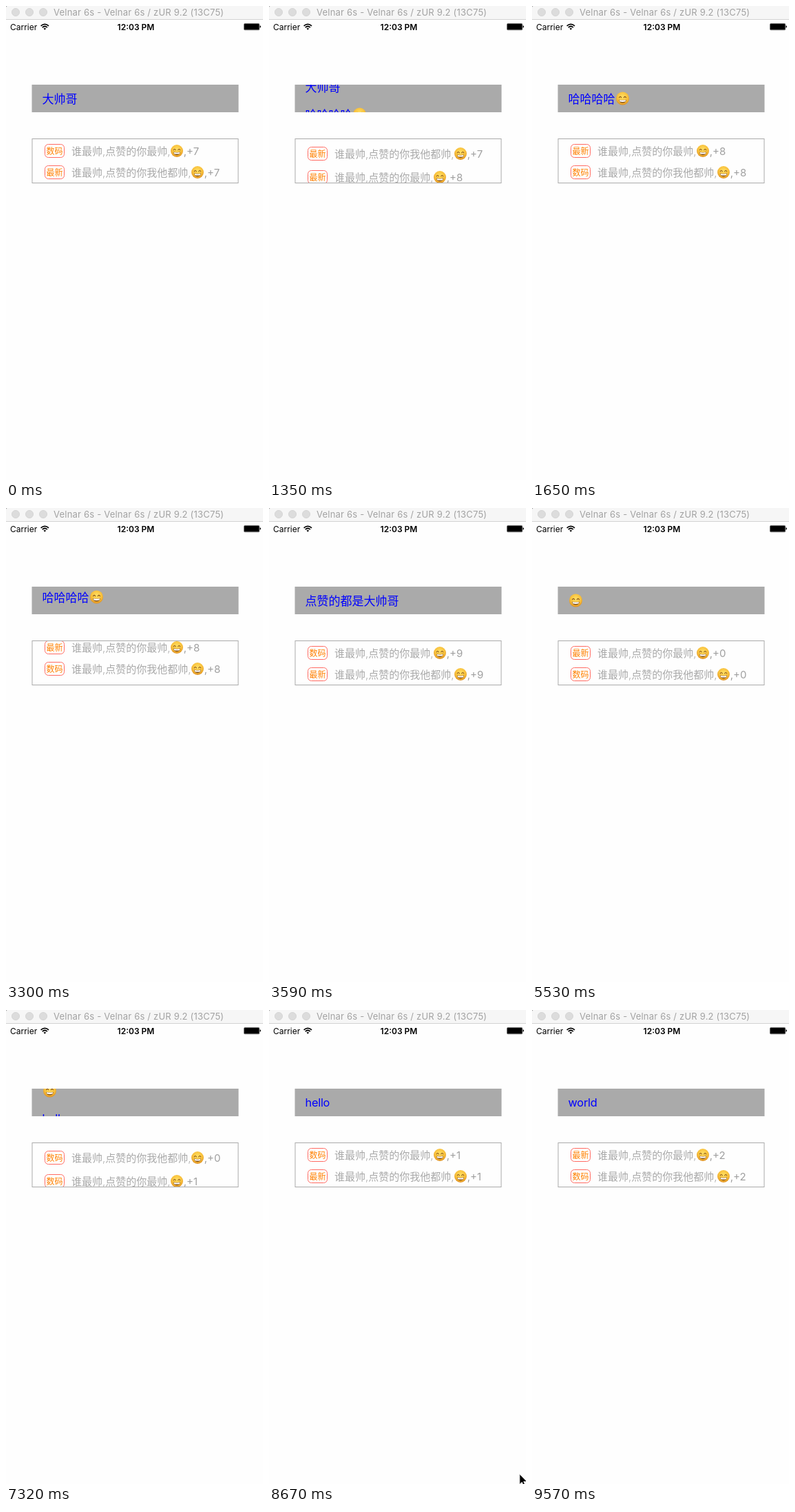
An HTML page for the animation above (9980 ms loop, 373 by 687 pixels).

```html
<!DOCTYPE html>
<html lang="zh">
<head>
<meta charset="utf-8">
<title>Scrolling notices</title>
<style>
  html, body { margin: 0; width: 100%; height: 100%; overflow: hidden; background: #fefefe; }
  svg { display: block; }
  text { font-family: Inter, "Noto Sans CJK SC", "Noto Sans CJK", sans-serif; white-space: pre; }
  .title { font-size: 13px; letter-spacing: .2px; fill: #a2a2a2; }
  .status { font-size: 12px; fill: #000; }
  .headline { font-size: 17px; font-weight: 350; fill: #00f; }
  .latin { font-size: 16.3px; font-weight: 400; letter-spacing: -.25px; }
  .notice { font-size: 15px; font-weight: 350; fill: #a9a9a9; }
  .count { font-weight: 400; fill: #a0a0a0; }
  .tag { font-size: 12px; font-weight: 350; fill: #ff8000; }
  .tag-box { fill: none; stroke: #ff6b63; }
</style>
</head>
<body>
<svg width="373" height="687" viewBox="0 0 373 687">
  <defs>
    <radialGradient id="skin" cx=".5" cy=".38" r=".66">
      <stop offset="0" stop-color="#ffe066"/>
      <stop offset=".6" stop-color="#f8c03a"/>
      <stop offset="1" stop-color="#d9861d"/>
    </radialGradient>
    <g id="smile">
      <circle r="9.3" fill="url(#skin)"/>
      <path d="M-4.9-1.2Q-3.3-4-1.7-1.2M1.7-1.2Q3.3-4 4.9-1.2" fill="none" stroke="#84511a" stroke-width="1.1" stroke-linecap="round"/>
      <path d="M-5.4 1.6Q0 2.6 5.4 1.6Q4.4 6.4 0 6.4T-5.4 1.6Z" fill="#84511a"/>
      <path d="M-4.7 2.1Q0 3 4.7 2.1L3.9 4.4Q0 5.2-3.9 4.4Z" fill="#fff"/>
    </g>
    <clipPath id="bar-clip"><rect x="37.5" y="114" width="300" height="40"/></clipPath>
    <clipPath id="box-clip"><rect x="38" y="192" width="299" height="64"/></clipPath>
  </defs>

  <rect width="373" height="687" fill="#fefefe"/>
  <rect width="373" height="19" fill="#f6f6f6"/>
  <rect y="19" width="373" height="1" fill="#d3d3d3"/>
  <path d="M0 0H2Q0 0 0 2Z" fill="#777"/>
  <g fill="#dcdcdc" stroke="#d5d5d5">
    <circle cx="14" cy="9" r="5.5"/>
    <circle cx="34" cy="9" r="5.5"/>
    <circle cx="54" cy="9" r="5.5"/>
  </g>
  <text class="title" x="69" y="14">Velnar 6s - Velnar 6s / zUR 9.2 (13C75)</text>

  <text class="status" x="6" y="34.5">Carrier</text>
  <g fill="none" stroke="#000" stroke-width="1.7">
    <path d="M50.6 28.9Q56.3 23.8 62 28.9M52.7 31.1Q56.3 27.9 59.9 31.1"/>
    <path d="M56.3 34.8L54.4 32.6Q56.3 31.2 58.2 32.6Z" fill="#000" stroke="none"/>
  </g>
  <text class="status" x="188.5" y="34.5" text-anchor="middle" font-weight="600">12:03 PM</text>
  <rect x="345.4" y="25.4" width="22.4" height="9.4" rx="1.5" fill="#777" stroke="#333" stroke-width=".6"/>
  <rect x="346" y="26" width="21" height="8" rx=".6"/>
  <path d="M368.4 28.3Q370 28.6 370 30T368.4 31.7Z"/>

  <rect x="37.5" y="114" width="300" height="40" fill="#aaa"/>
  <g clip-path="url(#bar-clip)"><g id="headlines"></g></g>
  <g clip-path="url(#box-clip)"><g id="notices"></g></g>
  <rect x="38" y="192.5" width="299" height="64" fill="none" stroke="#aaa"/>

  <path id="cursor" d="M.8 .8V15.4L4.2 12.3L6.4 17.4L8.8 16.4L6.6 11.4H11.2Z" fill="#000" stroke="#ddd" stroke-width=".9"/>
</svg>
<script>
const LOOP = 9980;
const BAR_HEIGHT = 40;
const BOX_HEIGHT = 65;
const byId = id => document.getElementById(id);

// Headline text, x of its smile (if any), and the count on both notices.
const pages = [
  ['大帅哥', 0, 7],
  ['哈哈哈哈', 131.5, 8],
  ['点赞的都是大帅哥', 0, 9],
  ['', 63.5, 0],
  ['hello', 0, 1],
  ['world', 0, 2]
];

// Time in ms and scroll position in pages, held until the next entry.
const scroll = [
  [0, 0],
  [1350, .42], [1500, .985], [1650, 1],
  [3300, 1.125], [3440, 1.83], [3590, 2],
  [5230, 2.02], [5380, 2.57], [5530, 3],
  [7320, 3.42], [7470, 3.985], [7620, 4],
  [9270, 4.1], [9420, 4.8], [9570, 5]
];

const pointer = [
  [0, [400, 700]], [8670, [363, 672]], [8820, [351, 686]], [8970, [400, 700]]
];

const smile = (x, y, scale) =>
  `<use href="#smile" transform="translate(${x} ${y}) scale(${scale})"/>`;

function headline([words, smileX], i) {
  const middle = 134 + i * BAR_HEIGHT;
  const latin = /[a-z]/.test(words);
  const baseline = middle + (latin ? 6 : 6.5);
  return `<text class="headline${latin ? ' latin' : ''}" x="52.6" y="${baseline}">${words}</text>` +
    (smileX ? smile(smileX, middle, 1.02) : '');
}

function notice(y, tag, words, smileX, count) {
  return `<rect class="tag-box" x="56.5" y="${y - 9.5}" width="28" height="19" rx="5"/>
    <text class="tag" x="58.5" y="${y + 4.6}">${tag}</text>
    <text class="notice" x="95" y="${y + 5.5}">谁最帅,点赞的你${words}帅,</text>
    ${smile(smileX, y, .96)}
    <text class="notice count" x="${smileX + 9.8}" y="${y + 5.5}">,+${count}</text>`;
}

function noticePair([, , count], i) {
  const tags = i % 2 ? ['最新', '数码'] : ['数码', '最新'];
  const y = 210 + i * BOX_HEIGHT;
  return notice(y, tags[0], '最', 248, count) +
    notice(y + 31, tags[1], '我他都', 278, count);
}

function hold(element, steps, toTransform) {
  const frames = steps.map(([time, value]) => ({
    offset: Math.max(0, time - .5) / LOOP,
    transform: toTransform(value),
    easing: 'step-end'
  }));
  frames.push({ ...frames[frames.length - 1], offset: 1 });
  element.animate(frames, { duration: LOOP, iterations: Infinity });
}

const shiftBy = height => page => `translateY(${-Math.round(page * height)}px)`;

byId('headlines').innerHTML = pages.map(headline).join('');
byId('notices').innerHTML = pages.map(noticePair).join('');

hold(byId('headlines'), scroll, shiftBy(BAR_HEIGHT));
hold(byId('notices'), scroll, shiftBy(BOX_HEIGHT));
hold(byId('cursor'), pointer, ([x, y]) => `translate(${x}px, ${y}px)`);
</script>
</body>
</html>
```
